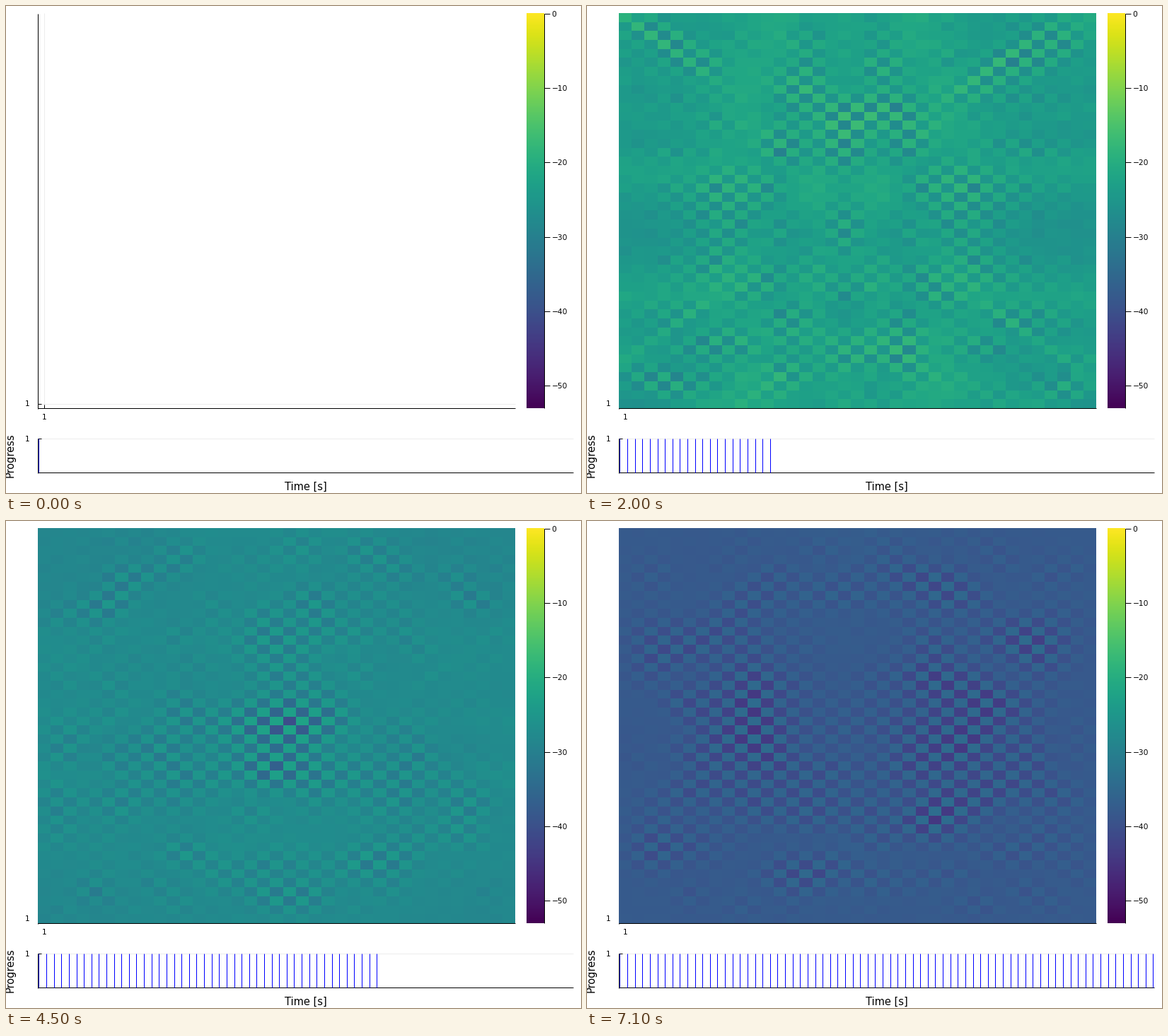
Recreate the animation shown at these times as a matplotlib script. Size 813 by 689 pixels, loop 7200 ms.

```python
import numpy as np
import matplotlib.pyplot as plt
from matplotlib.animation import FuncAnimation

W, H, DPI = 813, 689, 64
FRAMES, INTERVAL = 72, 100
COLS, ROWS = 37, 44
SRC_COL, SRC_ROW = 17, 24
STEPS = 6            # wave steps per frame
ABSORB = 0.1         # wall admittance
FLOOR = -53

# Median level in dB over the loop
LEVEL_AT = [8, 20, 37, 53, 64, 71]
LEVEL_DB = [-13, -23, -26, -29.5, -33, -38]


def start_pulse():
    r, c = np.mgrid[:ROWS, :COLS]
    r, c = r - SRC_ROW, c - SRC_COL
    pulse = np.exp(-(r**2 + c**2) / (2 * 0.9**2))
    pulse[(r + c) % 2 == 1] = 0
    pulse[pulse < 1e-3] = 0
    return pulse


def wall_loss():
    open_sides = np.zeros((ROWS, COLS))
    open_sides[[0, -1]] += 1
    open_sides[:, [0, -1]] += 1
    return open_sides * ABSORB / np.sqrt(8)


def simulate():
    """Pressure in a rectangular room, one field per frame."""
    loss = wall_loss()
    prev, now = np.zeros((ROWS, COLS)), start_pulse()
    fields = []
    for _ in range(FRAMES):
        fields.append(now)
        for _ in range(STEPS):
            p = np.pad(now, 1, mode="edge")
            near = p[:-2, 1:-1] + p[2:, 1:-1] + p[1:-1, :-2] + p[1:-1, 2:]
            prev, now = now, (near / 2 - (1 - loss) * prev) / (1 + loss)
    return fields


def to_levels(fields):
    raw = [20 * np.log10(np.abs(f) + 1e-12) for f in fields]
    levels = []
    for i, db in enumerate(raw):
        ref = np.median(raw[max(i, LEVEL_AT[0])])
        levels.append(db - ref + np.interp(i, LEVEL_AT, LEVEL_DB))
    return levels


levels = to_levels(simulate())

fig = plt.figure(figsize=(W / DPI, H / DPI), dpi=DPI, facecolor="white")
ax = fig.add_axes([0, 0, 1, 1])
plt.rcParams["font.family"] = "DejaVu Sans"


def px(size):
    return size * 72 / DPI


def line(x0, y0, x1, y1, color="black", width=1.0, z=1, **kw):
    return ax.plot([x0, x1], [y0, y1], color=color, lw=px(width), zorder=z,
                   solid_capstyle="butt", **kw)[0]


def label(x, y, text, size=10.67, ha="center", va="center_baseline", **kw):
    ax.text(x, y, text, fontsize=px(size), ha=ha, va=va, **kw)


# Main plot frame
line(54.3, 10, 54.3, 569, alpha=0.1, width=0.7)
line(45, 562.7, 720, 562.7, alpha=0.1, width=0.7)
line(45, 10.5, 45, 569.5)
line(44.5, 569, 720, 569)
line(45, 562.7, 49.5, 562.7)
line(54.3, 564, 54.3, 569)
label(33.5, 566.5, "1", ha="right", va="baseline")
label(54.3, 585.3, "1", va="baseline")

heat = ax.imshow(levels[-1], extent=(45, 720, 569, 10.5), cmap="viridis",
                 vmin=FLOOR, vmax=0, interpolation="nearest", zorder=2)

# Colour bar
ax.imshow(np.linspace(1, 0, 256)[:, None], extent=(736, 760.5, 569, 10.5),
          cmap="viridis", interpolation="nearest", zorder=2)
line(760.8, 10.5, 760.8, 569, z=3)
for db in range(0, -51, -10):
    y = 10.8 + (569 - 10.8) * db / FLOOR
    line(760.8, y, 769, y, z=3)
    label(771.5, y + 3.8, str(db).replace("-", "\u2212"), ha="left",
          va="baseline")

# Progress strip
line(45, 611.8, 801.5, 611.8, alpha=0.1, width=0.7)
line(45, 611.5, 45, 660.5)
line(44.5, 660, 801.5, 660)
line(45, 611.8, 49.5, 611.8)
label(33.5, 615.6, "1", ha="right", va="baseline")
label(424, 685.2, "Time [s]", 14.67, va="baseline")
label(13.2, 636, "Progress", 14.67, ha="right", va="center", rotation=90)
bars = [line(x, 611.8, x, 660, color="blue", z=3)
        for x in 46.4 + 10.62 * np.arange(FRAMES)]

ax.set_xlim(0, W)
ax.set_ylim(H, 0)
ax.set_aspect("auto")
ax.axis("off")


def draw(i):
    heat.set_data(levels[i])
    heat.set_visible(i > 0)
    for k, bar in enumerate(bars):
        bar.set_visible(k <= i)
    return [heat, *bars]


anim = FuncAnimation(fig, draw, frames=FRAMES, interval=INTERVAL, repeat=True)
plt.show()
```
